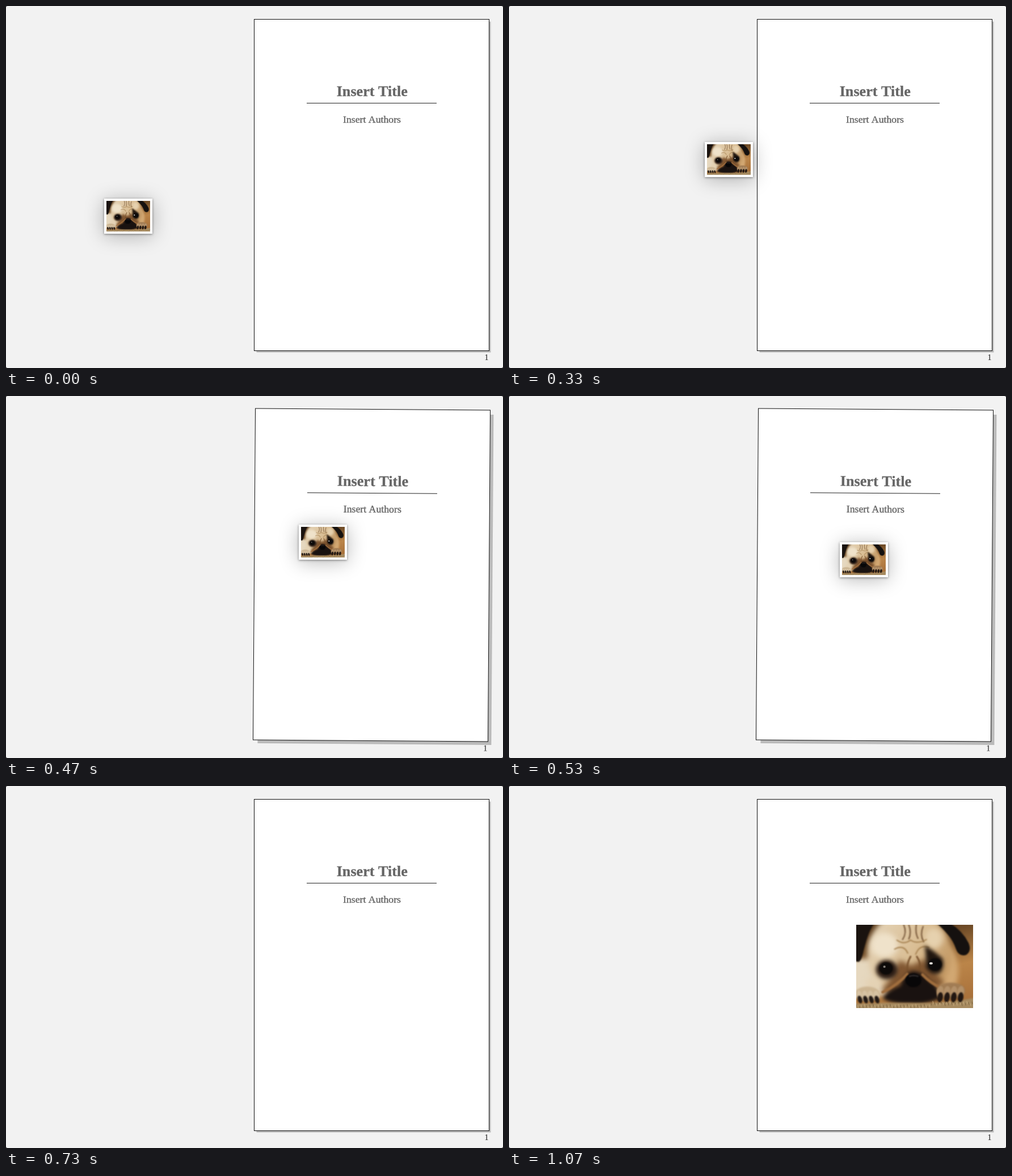
An HTML page with a canvas for the animation above (1.14 s loop, 876 by 639 pixels).

```html
<!DOCTYPE html>
<html lang="en">
<head>
<meta charset="utf-8">
<title>Drop a picture on a page</title>
<style>
  html, body { margin: 0; width: 100%; height: 100%; overflow: hidden; background: #f2f2f2; }
  canvas { display: block; width: 876px; height: 639px; }
</style>
</head>
<body>
<canvas id="stage" width="876" height="639"></canvas>
<script>
const W = 876, H = 639, LOOP = 1140, FPS = 15;
const SERIF = '"Liberation Serif", "Times New Roman", serif';
const PAGE = { x: 437.5, y: 23.5, w: 414, h: 585 };
const TILT = 0.4 * Math.PI / 180;
const OVER = 6, LEAN = 9, DROP = 10, REST = 11, PLACED = 12;

// Thumbnail path: step, left, top
const PATH = [[0, 173, 340], [2, 177, 332], [3, 185, 319], [4, 245, 281], [5, 345, 240],
              [6, 435, 218], [7, 516, 227], [8, 583, 258], [9, 596, 254]];

const ctx = document.getElementById('stage').getContext('2d');
const photo = makePhoto(206, 147);

function makePhoto(w, h) {
  const c = document.createElement('canvas');
  c.width = w;
  c.height = h;
  const g = c.getContext('2d');
  const soft = px => { g.filter = px ? `blur(${px}px)` : 'none'; };
  const oval = (x, y, rx, ry, color, turn = 0) => {
    g.fillStyle = color;
    g.beginPath();
    g.ellipse(x, y, rx, ry, turn, 0, 7);
    g.fill();
  };
  const shape = (d, color) => { g.fillStyle = color; g.fill(new Path2D(d)); };
  const line = (d, color, width) => {
    g.strokeStyle = color;
    g.lineWidth = width;
    g.lineCap = 'round';
    g.stroke(new Path2D(d));
  };

  const wall = g.createLinearGradient(150, 0, 185, h);
  wall.addColorStop(0, '#5e3f20');
  wall.addColorStop(0.5, '#bb8549');
  wall.addColorStop(1, '#a56d38');
  g.fillStyle = wall;
  g.fillRect(0, 0, w, h);

  // body and head
  soft(4);
  shape('M-9 60H40L60 125H-9Z', '#e6d8bf');
  oval(158, 82, 22, 44, '#d2a873');
  const fur = g.createLinearGradient(20, 0, 170, 90);
  fur.addColorStop(0, '#e6d6bb');
  fur.addColorStop(0.55, '#d9bd93');
  fur.addColorStop(1, '#bd8f58');
  oval(94, 52, 74, 76, fur);
  soft(5);
  oval(50, 36, 24, 22, '#efe2ca');
  oval(137, 24, 16, 18, '#e6d1ae');
  oval(31, 104, 14, 12, '#e4d2b4');
  shape('M76 62L97 72L122 60L156 104L104 128L44 118L62 92Z', '#805631');

  // ears
  soft(1);
  shape('M-3-3H33C23 8 17 30 12 52Q8 68 2 65L-3 64Z', '#1a130f');
  shape('M142-3H165Q187 10 198 32Q204 46 194 53Q181 57 176 43C170 24 158 12 142-3Z', '#15110f');

  // wrinkles
  soft(1);
  line('M84 0Q90 14 82 26M93 0Q98 14 93 25M106 0Q104 15 109 24M118 3Q112 18 119 30', '#6d4d30', 2);
  line('M72 27Q84 36 96 27Q108 35 124 26M68 43Q84 34 91 50M128 40Q112 34 105 52', '#a5804f', 2);
  line('M96 56Q88 70 91 84M107 56Q115 68 112 82', '#7a532e', 3);

  // eyes, muzzle and nose
  soft(3);
  oval(54, 79, 19, 17, '#2c1d15');
  shape('M121 36Q137 46 152 59Q157 72 149 84Q134 92 123 76Q124 58 121 36Z', '#20160f');
  shape('M100 82Q117 82 129 99Q147 110 148 130Q122 142 98 139Q64 141 47 130Q54 116 78 108Q86 84 100 82Z', '#191210');
  soft(1.2);
  line('M90 87Q75 105 47 119M117 88Q131 103 151 112', '#a06e3e', 5);
  oval(53, 77, 12, 11, '#0d0a09');
  oval(139, 70, 12, 11, '#0c0a0a');
  oval(101, 98, 14, 12, '#080708');
  line('M94 91Q101 88 109 91', '#3c3637', 2);
  soft(0.5);
  oval(50, 74, 2, 2, '#8d8780');
  oval(132, 68, 3, 2, '#dedbd6');

  // floor and paws
  soft(1.5);
  shape('M-3 139Q50 137 104 138T209 129V150H-3Z', '#a78b60');
  oval(20, 122, 22, 13, '#cdb693');
  oval(167, 116, 25, 14, '#a17c54');
  soft(0.8);
  for (let i = 0; i < 4; i++) {
    const l = 6 + i * 10, r = 148 + i * 12;
    oval(l, 125, 5, 9, '#d6c2a3', -0.2);
    oval(l + 1, 132, 4, 7, '#211813', -0.3);
    oval(r, 119, 6, 11, '#b3916a', 0.15);
    oval(r, 128, 5, 9, '#211712', 0.15);
  }

  // carpet pile
  soft(0);
  for (let i = 0; i < 70; i++) {
    const x = i * 3, y = 140 - 5 * (x > 130) + (i * 7) % 5;
    line(`M${x} ${y}l1 4`, i % 2 ? '#c6ac80' : '#7d6541', 1);
  }
  return c;
}

function spot(k) {
  let i = 0;
  while (i < PATH.length - 2 && PATH[i + 1][0] <= k) i++;
  const [ka, xa, ya] = PATH[i], [kb, xb, yb] = PATH[i + 1];
  const u = (k - ka) / (kb - ka);
  return [xa + (xb - xa) * u, ya + (yb - ya) * u];
}

function label(text, x, y, font, color, weight = 0) {
  ctx.font = `${font} ${SERIF}`;
  ctx.fillStyle = ctx.strokeStyle = color;
  ctx.fillText(text, x, y);
  if (!weight) return;
  ctx.lineWidth = weight;
  ctx.strokeText(text, x, y);
}

function drawPage(dir) {
  const { x, y, w, h } = PAGE, cx = x + w / 2, cy = y + h / 2;
  const near = dir ? 8 : 4, far = dir ? 6 : 3;
  ctx.save();
  ctx.translate(cx, cy);
  ctx.rotate(dir * TILT);
  ctx.translate(-cx, -cy);
  ctx.fillStyle = '#bababa';
  ctx.fillRect(x + near, y + near, w + far - near, h + far - near);
  ctx.fillStyle = '#fff';
  ctx.fillRect(x, y, w, h);
  ctx.strokeStyle = '#111';
  ctx.lineWidth = 1;
  ctx.strokeRect(x, y, w, h);
  ctx.fillStyle = '#222';
  ctx.fillRect(530, 171, 229, 1);
  ctx.textAlign = 'center';
  label('Insert Title', cx + 0.8, 159, 'bold 26.2px', '#666', 0.3);
  label('Insert Authors', cx + 0.5, 205.5, '17.75px', '#666', 0.4);
  label('1', 847, 625, '15px', '#222');
  ctx.restore();
}

function drawThumb(x, y) {
  const card = (blur, dy, alpha) => {
    ctx.shadowColor = `rgba(0,0,0,${alpha})`;
    ctx.shadowBlur = blur;
    ctx.shadowOffsetY = dy;
    ctx.fillRect(x, y, 85, 62);
  };
  ctx.save();
  ctx.fillStyle = '#fff';
  card(34, 4, 0.28);
  card(4, 1, 0.45);
  ctx.restore();
  ctx.drawImage(photo, x + 4, y + 4, 77, 54);
}

function drawCorners() {
  ctx.fillStyle = '#333';
  ctx.beginPath();
  ctx.rect(0, 0, W, H);
  ctx.roundRect(0, 0, W, H, 3);
  ctx.fill('evenodd');
}

function draw(k) {
  ctx.fillStyle = '#f2f2f2';
  ctx.fillRect(0, 0, W, H);
  drawPage(k < OVER || k >= REST ? 0 : k < LEAN ? 1 : -1);
  if (k < DROP) drawThumb(...spot(k));
  if (k >= PLACED) ctx.drawImage(photo, 611.5, 245, 206.5, 147);
  drawCorners();
}

// Steps fall on 15 per second, rounded to 10 ms.
const stepTime = k => Math.round(k * 100 / FPS) * 10;
function stepAt(t) {
  let k = 0;
  while (stepTime(k + 1) <= t && k < 16) k++;
  return k;
}

const start = performance.now();
function tick() {
  draw(stepAt((performance.now() - start) % LOOP));
  requestAnimationFrame(tick);
}
tick();
</script>
</body>
</html>
```
